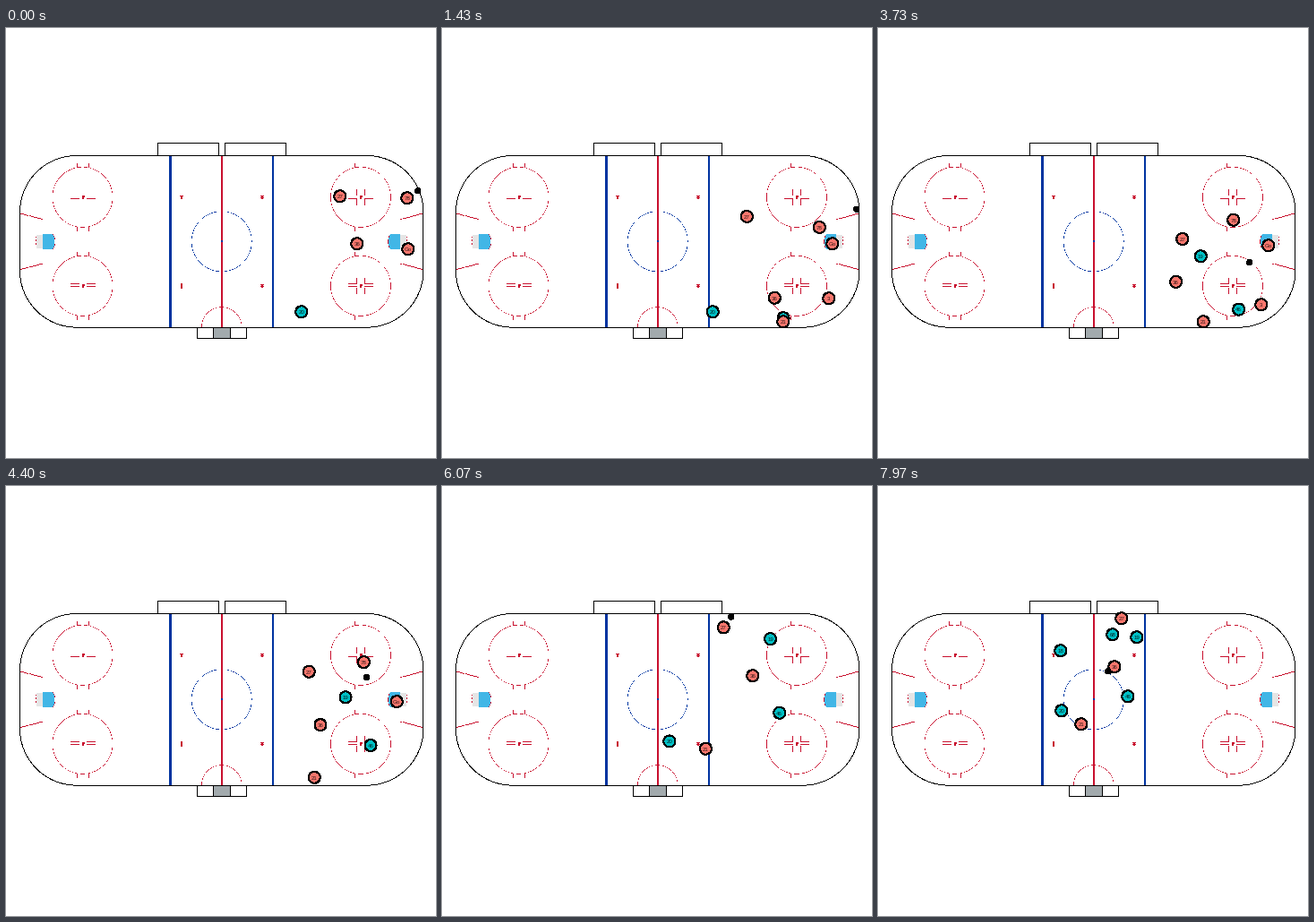
These frames come from a looping animation (480 by 480 pixels, 8 s). A matplotlib script:

```python
import numpy as np
import matplotlib.pyplot as plt
from matplotlib.animation import FuncAnimation
from matplotlib.patches import Circle

SIZE, LOOP, STEP = 480, 8000, 32
FT = 2.25                # pixels per foot
CX, CY = 240.2, 237.8    # centre ice
BLACK, RED, BLUE = (0, 0, 0), (200, 16, 46), (0, 51, 160)
CREASE, NET, GREY = (65, 182, 230), (229, 229, 229), (162, 170, 173)
HOME, AWAY = "#F8766D", "#00BFC4"

# times in seconds at which the skaters' places are given
BEATS = (0, 1.43, 2.53, 3.73, 5.07, 7.07, 7.97)
TAIL = 0.45

yy, xx = np.mgrid[0:SIZE, 0:SIZE]
rink = np.full((SIZE, SIZE, 3), 255, np.uint8)


def fill(x0, y0, x1, y1, color):
    rink[y0:y1 + 1, x0:x1 + 1] = color


def box(x0, y0, x1, y1):
    for x in (x0, x1):
        fill(x, y0, x, y1, BLACK)
    for y in (y0, y1):
        fill(x0, y, x1, y, BLACK)


def ring(cx, cy, feet, color):
    """Painted circle, two inches wide inside its radius."""
    r = feet * FT - 0.17
    rink[(abs(np.hypot(xx - cx, yy - cy) - r) < 0.24) & (yy < 334)] = color


def stroke(x0, y0, x1, y1, color):
    n = int(abs(x1 - x0)) + 1
    xs = np.linspace(x0, x1, n).round().astype(int)
    ys = np.linspace(y0, y1, n).round().astype(int)
    rink[ys, xs] = color


def goal(side):
    u = CX + side * (CX - xx)    # mirrored column
    dy = abs(yy - 238)
    reach = np.hypot(u - 40, dy)
    rink[(u >= 33.5) & (u < 40.5) & (dy <= 7)] = NET
    rink[(u >= 40.5) & (u <= 53.5) & (dy <= 8) & (reach <= 14.3)] = CREASE
    rink[(abs(reach - 14.5) < 0.2) & (u > 48) & (dy <= 8)] = RED
    rink[(abs(u - 33) < 0.5) & (dy <= 5) & (yy % 4 < 2)] = RED
    for v in (-1, 1):
        stroke(CX - side * 100 * FT, CY + v * 14 * FT,
               CX - side * 89 * FT, CY + v * 11 * FT, RED)


def faceoff(side, v):
    ring(CX + side * 69 * FT, CY + v * 22 * FT, 15, RED)
    cx, cy = (85, 395)[side > 0], (188, 287)[v > 0]
    for y in ([190] if v < 0 else [285, 288]):
        fill(cx - 13, y, cx - 4, y, RED)
        fill(cx + 5, y, cx + 14, y, RED)
    if side > 0:
        for x in (cx - 4, cx + 5):
            fill(x, cy - 8, x, cy - 2, RED)
            fill(x, cy + 3, x, cy + 9, RED)
    for x in ([cx - 6] if side > 0 else [cx - 6, cx + 7]):
        fill(x, cy - 37, x, cy - 33, RED)
        fill(x, cy + 34, x, cy + 38, RED)
    fill(cx, cy - 1, cx + 1, cy + 2, RED)
    fill(cx + 2, cy - 1, cx + 2, cy, RED)


def draw_rink():
    ring(CX, CY, 15, BLUE)
    ring(CX, CY + 42.5 * FT, 10, RED)
    fill(182, 143, 184, 333, BLUE)
    fill(297, 143, 298, 333, BLUE)
    fill(240, 143, 241, 333, RED)
    fill(240, 237, 241, 238, BLUE)
    for side in (-1, 1):
        goal(side)
        for v in (-1, 1):
            faceoff(side, v)
    # neutral zone spots
    fill(194, 187, 197, 187, RED)
    fill(195, 187, 196, 190, RED)
    fill(195, 285, 196, 290, RED)
    for y in (187, 286):
        fill(285, y, 286, y + 3, RED)
        for row in (y, y + 2):
            fill(284, row, 287, row, RED)
    # benches and penalty boxes
    box(169, 128, 237, 142)
    box(244, 128, 312, 142)
    box(213, 334, 268, 346)
    fill(231, 335, 250, 346, GREY)
    box(231, 334, 250, 346)
    # boards with rounded corners
    r = 28 * FT + 0.2
    qx = np.maximum(abs(xx - CX) - 72 * FT, 0)
    qy = np.maximum(abs(yy - CY) - 14.5 * FT, 0)
    rink[abs(np.hypot(qx, qy) - r) < 0.5] = BLACK


class Path:
    """Smooth way through timed points, carried on straight past both ends."""

    def __init__(self, times, points):
        self.t, self.p = np.array(times, float), np.array(points, float)
        self.m = np.zeros_like(self.p)
        if len(points) > 1:
            d = np.diff(self.p, axis=0) / np.diff(self.t)[:, None]
            self.m[0], self.m[-1] = d[0], d[-1]
            a, b = d[:-1], d[1:]
            same = a * b > 0
            self.m[1:-1] = np.where(same, 2 * a * b / np.where(same, a + b, 1), 0)

    def at(self, t):
        T, p, m = self.t, self.p, self.m
        if t <= T[0]:
            return p[0] + m[0] * (t - T[0])
        if t >= T[-1]:
            return p[-1] + m[-1] * (t - T[-1])
        i = np.searchsorted(T, t, "right") - 1
        h = T[i + 1] - T[i]
        s = (t - T[i]) / h
        ease = s * s * (3 - 2 * s)
        return (p[i] + ease * (p[i + 1] - p[i])
                + h * s * (1 - s) * ((1 - s) * m[i] - s * m[i + 1]))


fig = plt.figure(figsize=(4.8, 4.8), dpi=100, facecolor="white")
ax = fig.add_axes([0, 0, 1, 1])
draw_rink()
ax.imshow(rink, interpolation="nearest")
ax.set_xlim(-0.5, SIZE - 0.5)
ax.set_ylim(SIZE - 0.5, -0.5)
ax.axis("off")

movers = []


def add(label, color, beat, *points, times=BEATS, lead=TAIL, r=6.5):
    """A skater seen from the given beat on, one point per beat."""
    z = 3 + len(movers)
    dot = Circle((0, 0), r, fc=color, ec="black", lw=0.72, zorder=z, antialiased=False)
    ax.add_patch(dot)
    tag = ax.text(0, 0, label, family="Liberation Sans", fontsize=4.4, alpha=0.8,
                  ha="center", va="center_baseline", zorder=z + 0.5)
    path = Path(times[beat:beat + len(points)], points)
    movers.append((dot, tag, path, path.t[0] - lead, path.t[-1] + TAIL))


add("20", AWAY, 0, (330, 317), (302, 317))
add("20", AWAY, 5, (228, 267), (205, 251), lead=1.3)
add("46", AWAY, 1, (381, 324), (370, 326), (403, 314), (409, 264), (320, 245), (279, 235))
add("19", AWAY, 2, (313, 251), (361, 255), (389, 205), (325, 151), (289, 169))
add("18", AWAY, 5, (230, 170), (204, 184))
add("68", AWAY, 5, (280, 150), (262, 166))
add("27", HOME, 0, (373, 188), (340, 211))
add("27", HOME, 3, (340, 235), (336, 183), (285, 145), (272, 148))
add("78", HOME, 0, (448, 190), (421, 223), (391, 236), (397, 214), (402, 177))
add("36", HOME, 0, (392, 241), (371, 302), (325, 323), (333, 283), (367, 250),
    (307, 186), (264, 202))
add("3", HOME, 1, (432, 302))
add("3", HOME, 3, (428, 309))
add("21", HOME, 1, (381, 328), (379, 329), (363, 328), (321, 320), (265, 268), (227, 266))
add("Go", HOME, 0, (449, 247), (436, 241), (436, 241), (436, 243), (437, 237))
# the puck also rides the top boards for a moment
add("", "black", 0, (460, 182), (463, 203), (415, 299), (415, 261), (377, 167),
    (325, 146), (284, 178), (257, 207), times=sorted(BEATS + (6.0,)), r=2.7)


def draw(i):
    t = i * STEP / 1000
    for dot, tag, path, start, end in movers:
        seen = bool(start <= t <= end)
        dot.set_visible(seen)
        tag.set_visible(seen)
        x, y = path.at(t) - 0.7
        dot.center = (x, y)
        tag.set_position((x, y + 0.4))
    return [a for m in movers for a in m[:2]]


anim = FuncAnimation(fig, draw, frames=LOOP // STEP, interval=STEP,
                     init_func=lambda: draw(0), repeat=True, repeat_delay=0)
plt.show()
```
